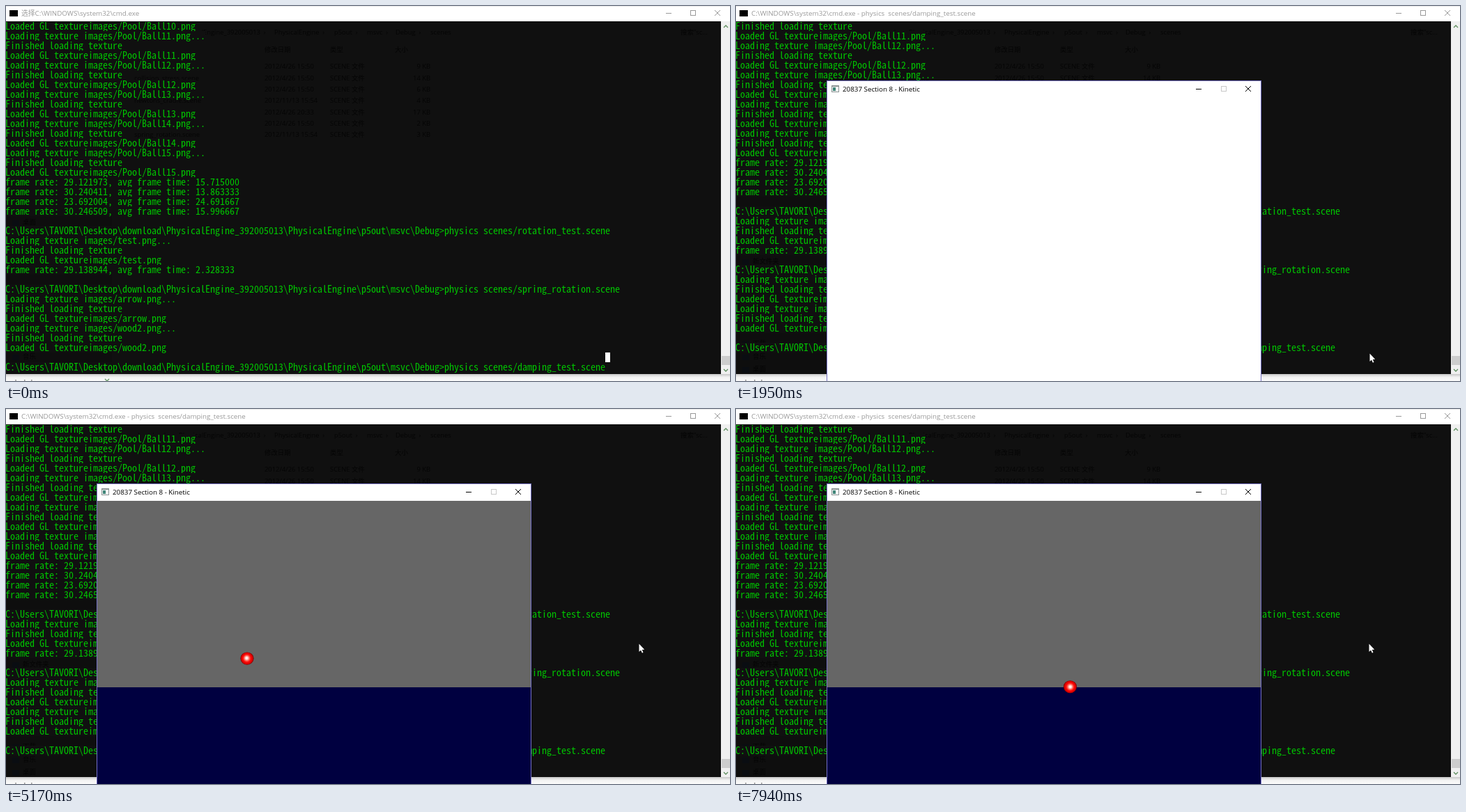
Recreate the animation shown at these times as an HTML page with a canvas. Size 1039x539 px, loop 8000 ms.

```html
<!DOCTYPE html>
<html lang="en">
<head>
<meta charset="utf-8">
<title>Damping test</title>
<style>
html, body { margin: 0; width: 100%; height: 100%; overflow: hidden; background: #fff; }
canvas { display: block; }
</style>
</head>
<body>
<canvas id="stage" width="1039" height="539"></canvas>
<script>
const ctx = document.getElementById('stage').getContext('2d');
const LOOP = 8000;
const UI = '"Open Sans", "Noto Sans CJK SC", "Noto Sans CJK", sans-serif';
const MONO = '"Noto Sans Mono CJK SC", "Liberation Mono", monospace';
const BG = '#101010', GREEN = '#00c400';
const CELL = 7, ROW = 14, LEFT = -1, TOP = 22, BOTTOM = 529;

const rect = (x, y, w, h, color) => {
  ctx.fillStyle = color;
  ctx.fillRect(x, y, w, h);
};

const label = (str, x, y, color, size = 9.8) => {
  ctx.font = `${size}px ${UI}`;
  ctx.textBaseline = 'middle';
  ctx.fillStyle = color;
  ctx.fillText(str, x, y);
};

const stroke = (color, width, ...points) => {
  ctx.strokeStyle = color;
  ctx.lineWidth = width;
  ctx.beginPath();
  points.forEach(([x, y], i) => i ? ctx.lineTo(x, y) : ctx.moveTo(x, y));
  ctx.stroke();
};

// Console text
const CMD = 'C:\\WINDOWS\\system32\\cmd.exe';
const prompt = scene => 'C:\\Users\\TAVORI\\Desktop\\download\\PhysicalEngine_392005013' +
  `\\PhysicalEngine\\p5out\\msvc\\Debug>physics scenes/${scene}.scene`;
const load = file => [`Loading texture images/${file}.png...`,
  'Finished loading texture', `Loaded GL textureimages/${file}.png`];
const rate = (fps, ms) => `frame rate: ${fps}, avg frame time: ${ms}`;

const lines = [
  'Loaded GL textureimages/Pool/Ball10.png',
  ...[11, 12, 13, 14, 15].flatMap(n => load('Pool/Ball' + n)),
  rate('29.121973', '15.715000'),
  rate('30.240411', '13.863333'),
  rate('23.692004', '24.691667'),
  rate('30.246509', '15.996667'),
  '',
  prompt('rotation_test'),
  ...load('test'),
  rate('29.138944', '2.328333'),
  '',
  prompt('spring_rotation'),
  ...load('arrow'),
  ...load('wood2'),
  '',
  prompt('damping_test')
];

// Folder window faintly visible through the console
const files = ['collision', 'collision_stress', 'damping_test', 'newtons_cradle',
  'pool', 'rotation_test', 'spring_rotation'];
const dates = ['2012/4/26 15:50', '2012/4/26 15:50', '2012/4/26 15:50', '2012/11/13 15:54',
  '2012/4/26 20:33', '2012/4/26 15:50', '2012/11/13 15:54'];
const sizes = [9, 14, 6, 4, 17, 2, 3];

function drawFolder(scroll) {
  const put = (str, x, y) => label(str, x, y, '#050505', 9.4);
  rect(0, 52, 152, BOTTOM - 52, '#0e0e0e');
  [['download  ›', 186], ['PhysicalEngine_392005013  ›', 248], ['PhysicalEngine  ›', 385],
    ['p5out  ›', 471], ['msvc  ›', 518], ['Debug  ›', 559], ['scenes', 609],
    ['搜索"sc...', 968]].forEach(([s, x]) => put(s, x, 39));
  put('修改日期', 371, 64);
  put('类型', 465, 64);
  put('大小', 558, 64);
  files.forEach((name, i) => {
    const y = 88 + i * 16.3;
    put(name + '.scene', 184, y);
    put(dates[i], 371, y);
    put('SCENE 文件', 465, y);
    ctx.textAlign = 'right';
    put(sizes[i] + ' KB', 609, y);
    ctx.textAlign = 'left';
  });
  const nav = [[['桌面', 312], ['音乐', 505]], [['电子邮件附件', 293], ['文档', 386], ['桌面', 523]],
    [['新文件夹', 368], ['下载', 486], ['音乐', 505], ['桌面', 523]]][scroll];
  nav.forEach(([s, y]) => {
    put(s, 24, y);
    rect(9, y - 4, 10, 8, '#0a0d12');
  });
}

function drawButtons(x, y, gap, color, maxColor) {
  const mid = Math.round(x + gap), end = Math.round(x + 2 * gap);
  stroke(color, 1, [x - 4, y + .5], [x + 4, y + .5]);
  ctx.strokeStyle = maxColor;
  ctx.strokeRect(mid - 3.5, y - 3.5, 7, 7);
  stroke(color, 1, [end - 4, y - 4], [end + 4, y + 4]);
  stroke(color, 1, [end + 4, y - 4], [end - 4, y + 4]);
}

function drawLines(scroll) {
  ctx.font = `14px ${MONO}`;
  ctx.textBaseline = 'alphabetic';
  ctx.letterSpacing = `${CELL - ctx.measureText('0').width}px`;
  lines.slice(scroll).forEach((line, i) => {
    const y = TOP + i * ROW;
    rect(LEFT, y, line.length * CELL, Math.min(ROW, BOTTOM - y), BG);
    ctx.fillStyle = GREEN;
    ctx.fillText(line, LEFT, y + 12);
  });
  ctx.letterSpacing = '0px';
}

function drawConsole(t) {
  const active = t >= 750 && t < 1950;
  const scroll = t < 1750 ? 0 : t < 1950 ? 1 : 2;

  rect(0, 0, 1039, 539, '#fff');
  rect(0, 0, 1039, 1, active ? '#c4c4c4' : '#ececec');
  rect(5, 6, 12, 9, '#000');
  const title = (t < 1200 ? '选择' : '') + CMD +
    (t < 1750 ? '' : ' - physics  scenes/damping_test.scene');
  label(title, 22, 11, active ? '#000' : '#999');
  const ink = active ? '#000' : '#999';
  drawButtons(951, 10, 35.2, ink, ink);

  rect(0, TOP, 1026, BOTTOM - TOP, BG);
  drawFolder(scroll);
  drawLines(scroll);
  const caret = LEFT + 123 * CELL;
  if (t < 1200) rect(caret, TOP + 34 * ROW, CELL, ROW, '#fff');
  else if (t >= 1300 && t < 1750) rect(caret, TOP + 36 * ROW - 2, CELL, 2, GREEN);

  // Scrollbar
  rect(1026, TOP, 13, BOTTOM - TOP, '#f0f0f0');
  rect(1027, 503, 12, 13, '#cdcdcd');
  stroke('#5f8f5f', 1.3, [1030, 31], [1033, 28], [1036, 31]);
  stroke('#5f8f5f', 1.3, [1030, 522], [1033, 525], [1036, 522]);

  // Strip below
  const shade = ctx.createLinearGradient(0, BOTTOM, 0, 539);
  shade.addColorStop(0, active ? '#a8a8a8' : '#c8c8c8');
  shade.addColorStop(.45, active ? '#e2e2e2' : '#f2f2f2');
  shade.addColorStop(1, '#fbfbfb');
  rect(0, BOTTOM, 1039, 10, shade);
  label('· Ladu.l..', 8, 542, '#333', 9);
  stroke(active ? '#111' : '#6a9a6a', 1.4, [142, 536], [145, 539], [148, 536]);
}

// Bouncing ball: free fall, then arcs that shrink at each impact
const FLOOR = 407, G = 86;
function ballAt(t) {
  const s = t / 1000;
  if (s < 3.89) {
    const fall = Math.max(0, s - 2.532);
    return [173.6 + 73.3 * fall, 327.7 + G / 2 * fall * fall];
  }
  const [start, span, x, vx] = s < 6.05 ? [3.89, 2.16, 273.1, 56.9]
    : s < 7.8 ? [6.05, 1.75, 396, 44.9]
    : [7.8, 1.41, 474.6, 35];
  const u = s - start;
  return [x + vx * u, FLOOR - G / 2 * u * (span - u)];
}

function drawBall(t) {
  const [x, y] = ballAt(t);
  const hx = x + (x - 442) / 130, hy = y + (y - 400) / 60;
  const skin = ctx.createRadialGradient(hx, hy, 0, x, y, 9.6);
  [[0, '#fff'], [.16, '#ffe4e0'], [.42, '#ff5548'], [.6, '#fb0a08'], [.82, '#dc0000'], [1, '#6c0000']]
    .forEach(([at, color]) => skin.addColorStop(at, color));
  ctx.fillStyle = skin;
  ctx.beginPath();
  ctx.ellipse(x, y, 9.6, 9.2, 0, 0, Math.PI * 2);
  ctx.fill();
}

function drawApp(t) {
  rect(130, 107, 624, 432, '#7470c4');
  rect(131, 108, 622, 431, '#fff');
  rect(137, 114, 11, 10, '#8c9494');
  rect(138, 116, 9, 7, '#f4f4f4');
  rect(139, 117, 4, 5, '#3f8578');
  label('20837 Section 8 - Kinetic', 153, 120, '#000');
  drawButtons(664, 119, 35.5, '#000', '#c8c8c8');
  if (t < 2180) return;
  rect(131, 132, 622, 268, '#666');
  rect(131, 400, 622, 139, '#000040');
  drawBall(t);
}

// Pointer waypoints: time, x, y
const route = [[100, 937, 520], [430, 909, 499], [2180, 909, 499], [2620, 578, 196],
  [2930, 578, 196], [3160, 690, 129], [3600, 908, 337]];

function pointerAt(t) {
  const i = route.findIndex(p => p[0] > t);
  if (i < 0) return route[route.length - 1].slice(1);
  const [a, ax, ay] = route[i - 1], [b, bx, by] = route[i];
  const k = (t - a) / (b - a);
  return [Math.round(ax + (bx - ax) * k), Math.round(ay + (by - ay) * k)];
}

function drawPointer(t) {
  if (t < 100) return;
  const [x, y] = pointerAt(t);
  ctx.beginPath();
  [[0, 0], [0, 11.5], [2.6, 9.2], [4.4, 13.2], [6, 12.4], [4.4, 8.4], [7.8, 8.2]]
    .forEach(([dx, dy]) => ctx.lineTo(x + .5 + dx, y + .5 + dy));
  ctx.closePath();
  ctx.fillStyle = '#fff';
  ctx.strokeStyle = '#000';
  ctx.lineWidth = 1;
  ctx.stroke();
  ctx.fill();
}

function step(t) {
  if (t >= 2180) return 2180 + Math.floor((t - 2172) / 110.77) * 110.77;
  if (t >= 100 && t < 430) return 100 + Math.floor((t - 100) / 110) * 110;
  return t;
}

function draw(now) {
  const t = step(Math.max(0, now - begin) % LOOP);
  ctx.lineWidth = 1;
  drawConsole(t);
  if (t >= 1950) drawApp(t);
  drawPointer(t);
  requestAnimationFrame(draw);
}

const begin = performance.now();
draw(begin);
</script>
</body>
</html>
```
